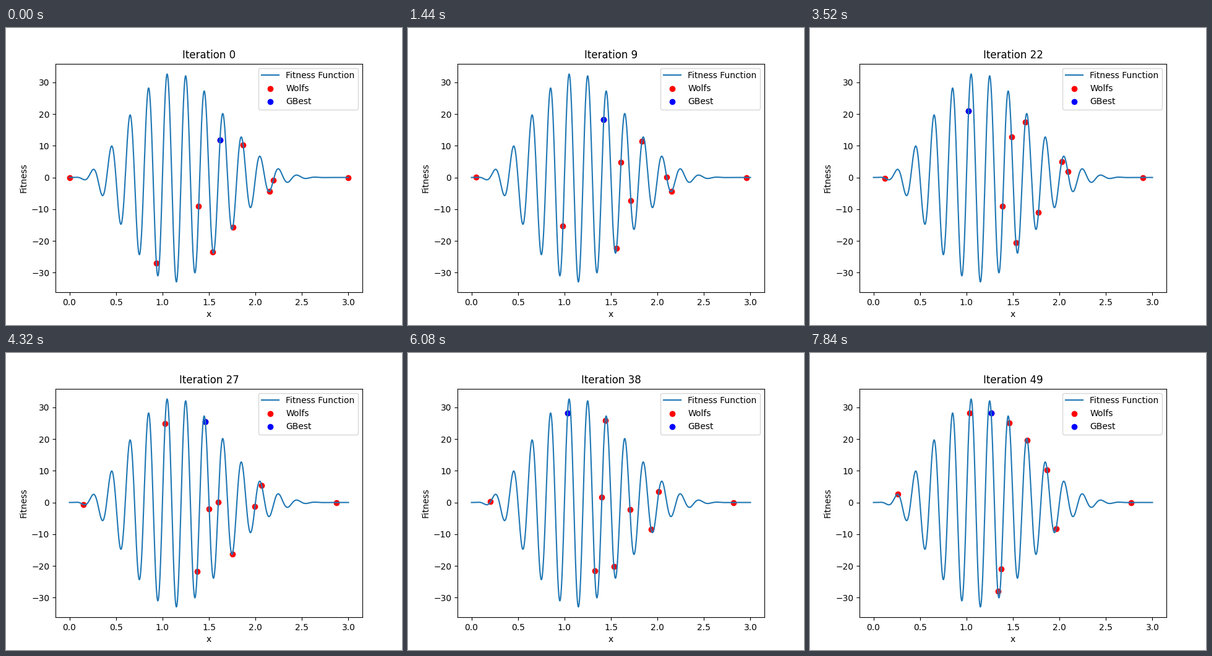
A matplotlib script for the animation above (8000 ms loop, 640 by 480 pixels).

```python
import numpy as np
import matplotlib.pyplot as plt
from matplotlib.animation import FuncAnimation

FRAMES, INTERVAL = 50, 160

# Each wolf: starting x, and step per iteration in thousandths.
PACK = [(0.0037, 5.29), (0.9342, 5.52), (1.39, 5.43), (1.5424, 5.86),
        (1.6187, 5.81), (1.7576, 6.3), (1.8679, 4.43), (2.1516, 5.79),
        (2.192, 4.66), (2.9983, 4.687)]


def fitness(x):
    return x**3 * (3 - x)**5 * np.sin(10 * np.pi * x)


def hunt(x, step):
    """Every wolf steps towards the best one, which waits until it is beaten."""
    for _ in range(FRAMES):
        yield np.column_stack([x, fitness(x)])
        x = x + step * np.sign(x[np.argmax(fitness(x))] - x)


start, pace = np.array(PACK).T
path = list(hunt(start, pace / 1000))

fig, ax = plt.subplots(figsize=(6.4, 4.8), dpi=100)
grid = np.linspace(0, 3, 1000)
ax.plot(grid, fitness(grid), label="Fitness Function")
wolves = ax.scatter(*path[0].T, color="red", label="Wolfs")
leader = ax.scatter([1.5], [0], color="blue", label="GBest")
ax.set_xlabel("x")
ax.set_ylabel("Fitness")
ax.legend(loc="upper right")
title = ax.set_title("Iteration 0")


def draw(i):
    spots = path[i]
    wolves.set_offsets(spots)
    leader.set_offsets(spots[[np.argmax(spots[:, 1])]])
    title.set_text(f"Iteration {i}")
    return wolves, leader, title


anim = FuncAnimation(fig, draw, frames=FRAMES, init_func=lambda: draw(0),
                     interval=INTERVAL, repeat=True, repeat_delay=0)
plt.show()
```
